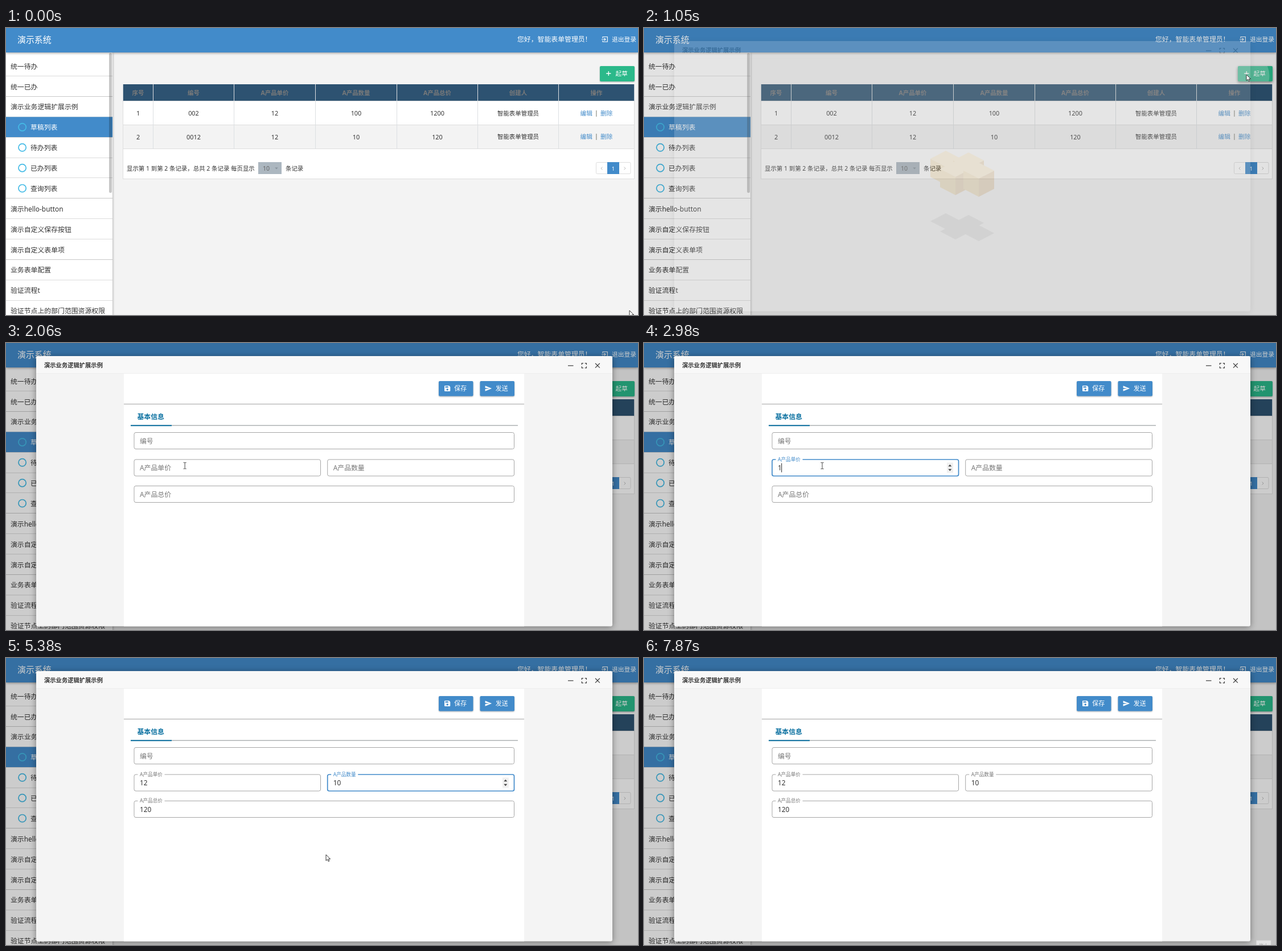
Animation of 1110x505 px, one loop 7.94 s. Source, as an HTML page:

```html
<!DOCTYPE html>
<html lang="zh-CN">
<head>
<meta charset="utf-8">
<title>演示系统</title>
<style>
  html, body { margin: 0; width: 100%; height: 100%; overflow: hidden; background: #f3f3f3; }
  svg { display: block; width: 1110px; height: 505px; }
  text { font-family: "Noto Sans", "Noto Sans CJK SC", sans-serif; white-space: pre; }
  .bar { filter: drop-shadow(0 1px 2px rgba(0, 0, 0, .4)); }
  .btn { filter: drop-shadow(0 1px 1.2px rgba(0, 0, 0, .3)); }
  .win { filter: drop-shadow(0 2px 6px rgba(0, 0, 0, .4)); }
</style>
</head>
<body>
<svg id="stage" viewBox="0 0 1110 505"></svg>
<script>
const LOOP = 7940, BLUE = '#428bca', INK = '#333', BASE = 11.86, SMALL = 10.45;
const stage = document.getElementById('stage');
let layer = stage;

function el(tag, attrs, parent = layer) {
  const node = document.createElementNS('http://www.w3.org/2000/svg', tag);
  for (const k in attrs) node.setAttribute(k, attrs[k]);
  return parent.appendChild(node);
}
const set = (node, attrs) => { for (const k in attrs) node.setAttribute(k, attrs[k]); };
const group = (attrs = {}, parent = stage) => (layer = el('g', attrs, parent));
const rect = (x, y, width, height, fill, more) => el('rect', { x, y, width, height, fill, ...more });
const path = (d, more) => el('path', { d, fill: 'none', ...more });
const line = (d, stroke, width = 1) => path(d, { stroke, 'stroke-width': width });
// text is placed by the vertical centre of its glyphs
function label(x, cy, str, size = BASE, fill = INK, more) {
  const node = el('text', { x, y: cy + size * .37, 'font-size': size, fill, ...more });
  node.textContent = str;
  return node;
}
const MID = { 'text-anchor': 'middle' }, BOLD = { 'font-weight': 700 };

const ramp = (t, a, b) => Math.min(1, Math.max(0, (t - a) / (b - a)));
const ease = p => p * p * (3 - 2 * p);
const during = (t, a, b) => t >= a && t < b;
const show = (node, on) => node.setAttribute('visibility', on ? 'visible' : 'hidden');

// ---- list page ----
group();
rect(0, 0, 1110, 505, '#f3f3f3');

rect(0, 43, 187, 462, '#fff', { class: 'bar' });
const menu = ['统一待办', '统一已办', '演示业务逻辑扩展示例', '草稿列表', '待办列表', '已办列表', '查询列表',
  '演示hello-button', '演示自定义保存按钮', '演示自定义表单项', '业务表单配置', '验证流程t', '验证节点上的部门范围资源权限'];
menu.forEach((name, i) => {
  const y = 67 + 35.88 * i, sub = i > 2 && i < 7, active = i === 3;
  line(`M0 ${Math.round(y + 17) + .5}H187`, [1, 6, 9].includes(i) ? '#c8c8c8' : '#dcdcdc');
  if (active) rect(0, 156.5, 187, 35.5, BLUE);
  if (sub) el('circle', { cx: 28.6, cy: y - .2, r: 6.6, fill: 'none', stroke: '#45bbe6', 'stroke-width': 1.7 });
  label(sub ? 43 : 8, y + .3, name, BASE, active ? '#fff' : INK);
});
rect(181, 44, 5, 246, '#000', { opacity: .22, rx: 2 });

rect(0, 0, 1110, 43, BLUE, { class: 'bar' });
label(20, 20, '演示系统', 14.9, '#fff');
label(898, 20, '您好，智能表单管理员！', BASE, '#fff');
path('M1048 18V15.5H1056.3V24.3H1048V22M1046 20H1053M1050.6 17.6 1053 20 1050.6 22.4', { stroke: '#fff', 'stroke-width': 1.1 });
label(1064, 20, '退出登录', 10.75, '#fff');

const draft = rect(1043, 67, 61, 27, '#2bb98a', { rx: 2, class: 'btn' });
const clip = el('clipPath', { id: 'draftBox' });
el('rect', { x: 1043, y: 67, width: 61, height: 27, rx: 2 }, clip);
const ripple = el('circle', { cx: 1058, cy: 84, r: 0, fill: '#fff', 'clip-path': 'url(#draftBox)' });
line('M1054.2 80H1062.4M1058.3 76V84', '#fff', 1.3);
label(1070.5, 80, '起草', 10.7, '#fff');

const edges = [205.5, 258.5, 400.5, 543.5, 686.5, 828.5, 970.5, 1103.5];
const heads = ['序号', '编号', 'A产品单价', 'A产品数量', 'A产品总价', '创建人', '操作'];
const rows = [['1', '002', '12', '100', '1200', '智能表单管理员'], ['2', '0012', '12', '10', '120', '智能表单管理员']];
const mid = i => (edges[i] + edges[i + 1]) / 2;
rect(205.5, 128.5, 898, 137, '#fff', { stroke: '#dedede' });
rect(205.5, 99, 898, 29.5, '#2d5271');
rect(206, 170.5, 897, 42, '#f3f3f3');
line('M205.5 128.5H1103.5M205.5 170.5H1103.5M205.5 212.5H1103.5', '#dedede');
edges.slice(1, 7).forEach(x => line(`M${x} 99V212.5`, '#dcdfe2'));
line('M205.5 99V128M1103.5 99V128', '#c3ccd4');
heads.forEach((h, i) => label(mid(i), 114.5, h, SMALL, '#7a7a7a', { ...MID, ...BOLD }));
rows.forEach((row, r) => {
  const y = 150 + 41.5 * r;
  row.forEach((v, i) => label(mid(i), y, v, i < 5 ? 10.9 : SMALL, INK, MID));
  label(1008.5, y, '编辑', 10.7, BLUE);
  label(1037, y - 1, '|', 10.7, '#554', MID);
  label(1044, y, '删除', 10.7, BLUE);
});
label(212, 247, '显示第 1 到第 2 条记录，总共 2 条记录 每页显示', SMALL);
rect(443, 236, 41, 21, '#acb7c0');
label(451, 247, '10', 10.6, '#666');
path('M472.3 245.5H477.7L475 248.6Z', { fill: '#87929b' });
label(491, 247, '条记录', SMALL);
rect(1036.5, 236.5, 60.5, 20, '#fff', { stroke: '#ddd', rx: 2 });
rect(1056, 236, 21, 21, BLUE);
label(1066.5, 247, '1', 9.5, '#fff', MID);
line('M1047.5 244.5 1045 247 1047.5 249.5M1085.5 244.5 1088 247 1085.5 249.5', '#bbb');

group();
const shade = rect(0, 0, 1110, 505, '#000');

// ---- dialog ----
const dialog = group();
rect(53, 23, 1012, 475.5, '#f4f4f4', { rx: 3, class: 'win' });
path('M53 54V26Q53 23 56 23H1062Q1065 23 1065 26V54Z', { fill: '#f8f8f8' });
line('M53 53.5H1065', '#eee');
label(67, 39, '演示业务逻辑扩展示例', 10.3, INK, BOLD);
line('M987 39.8H996.5M1035 35.8 1042.8 43.6M1042.8 35.8 1035 43.6', '#444', 1.3);
line('M1011.3 38.2V35.6H1014M1016.7 35.6H1019.4V38.2M1019.4 41.2V43.8H1016.7M1014 43.8H1011.3V41.2', '#444', 1.3);

// loading picture
const loading = group({}, dialog);
const diamond = (x, y) => `M${x - 27} ${y}L${x} ${y - 14} ${x + 27} ${y} ${x} ${y + 14}Z`;
[[530, 230], [570, 233], [547, 248], [588, 251]].forEach(([x, y], i) => {
  path(diamond(x, y + 110), { fill: '#bcbcbc' });
  path(`M${x - 27} ${y}L${x} ${y + 14}V${y + 46}L${x - 27} ${y + 32}Z`, { fill: '#e8b650' });
  path(`M${x + 27} ${y}L${x} ${y + 14}V${y + 46}L${x + 27} ${y + 32}Z`, { fill: '#cf9440' });
  path(diamond(x, y), { fill: '#ffd888' });
});

// form
const form = group({}, dialog);
rect(207, 54, 703, 444.5, '#fff');
line('M207 107.5H910', '#bdbdbd', 1.7);
[[760, '保存'], [832.5, '发送']].forEach(([x, name]) => {
  rect(x, 67, 60.5, 26.5, BLUE, { rx: 2, class: 'btn' });
  label(x + 27.3, 80, name, 11, '#fff');
});
path('M770 76.2Q770 75 771.2 75H778L780.3 77.3V83.8Q780.3 85 779.1 85H771.2Q770 85 770 83.8ZM771.5 76.2V78.6H776.8V76.2ZM775.2 80.2A1.7 1.7 0 1 0 775.21 80.2Z',
  { fill: '#fff', 'fill-rule': 'evenodd' });
path('M841.6 75.2 853.2 80 841.6 84.8V81.1L849.5 80 841.6 78.9Z', { fill: '#fff' });
label(230.5, 130, '基本信息', BASE, '#0a70a0', BOLD);
line('M219 145.2H899', '#b9bcbe', 1.7);
line('M219 145.2H291', '#0a70a0', 2);

function makeField(x, y, w, name) {
  const g = group({}, form);
  const box = rect(x + .5, y + .5, w - 1, 29, '#fff', { rx: 3 });
  const notch = rect(x + 7, y - 1, 47, 3, '#fff');
  const text = label(0, 0, name);
  const value = label(x + 10.5, y + 15.3, '');
  const caret = rect(x + 10, y + 7, 1, 16, '#222');
  const spin = group({}, g);
  rect(x + w - 21, y + 6, 11, 18, '#f0f0f0');
  path(`M${x + w - 18.7} ${y + 12.8}h6l-3-3.6zM${x + w - 18.7} ${y + 17.2}h6l-3 3.6z`, { fill: '#444' });
  return {
    holds: (px, py) => px > x && px < x + w && py > y && py < y + 30,
    draw(lift, focus, str = '', blink = false) {
      const k = 1 - lift * .275;
      set(box, { stroke: focus ? BLUE : '#a6a6a6', 'stroke-width': focus ? 1.7 : 1 });
      set(notch, { width: 47 * lift });
      set(text, { transform: `translate(${x + 10.5} ${y + 15.2 - 15 * lift}) scale(${k})`, fill: focus ? BLUE : '#777' });
      value.textContent = str;
      set(caret, { x: x + 10 + 6.7 * str.length });
      show(caret, blink);
      show(spin, focus);
    }
  };
}
const code = makeField(224.5, 157, 668.5, '编号');
const price = makeField(224.5, 204.5, 328.5, 'A产品单价');
const count = makeField(564.2, 204.5, 328.8, 'A产品数量');
const total = makeField(224.5, 251, 668.5, 'A产品总价');
const fields = [code, price, count, total];

// ---- pointer and tooltip ----
const tip = group();
rect(1075.5, 497, 25.5, 20, '#e4e4e4', { stroke: '#d2d2d2', 'stroke-width': .8 });
label(1088, 506.5, '停止', 8.6, '#aaa', MID);

const pointer = group();
const arrow = path('M0 0V10.6L2.5 8.3 4.2 12 5.9 11.2 4.3 7.7H7.6Z', { fill: '#fff', stroke: '#222', 'stroke-width': .9 });
const beam = line('M-2.5 -5.5H-.6L0 -5 .6 -5.5H2.5M0 -5V5M-2.5 5.5H-.6L0 5 .6 5.5H2.5', '#444', 1);

const stops = [[0, 1095, 497], [60, 1095, 497], [850, 1058, 82], [1280, 1058, 82], [1690, 480, 183],
  [2080, 313, 216], [3330, 313, 216], [3860, 604, 216], [4940, 604, 216], [5350, 562, 346], [5600, 562, 346], [6140, 1062, 512]];
function pointerAt(t) {
  const i = stops.findIndex(s => s[0] > t);
  if (i < 0) return [1062, 520];
  const [a, x, y] = stops[i - 1], [b, x2, y2] = stops[i];
  const p = ease(ramp(t, a, b));
  return [x + (x2 - x) * p, y + (y2 - y) * p];
}

function render(t) {
  // ripple on the draft button
  const pressed = during(t, 890, 1200);
  set(ripple, { r: pressed ? 27 + (t - 980) * .19 : 0, opacity: .24 * (1 - ramp(t, 1070, 1200)) });
  draft.style.filter = during(t, 800, 1400) ? 'drop-shadow(0 2px 2.5px rgba(0,0,0,.45))' : '';

  set(shade, { opacity: .2 * ramp(t, 1013, 1080) });
  const fade = ramp(t, 1015, 1222);
  set(dialog, { opacity: fade, display: fade ? 'inline' : 'none' });
  set(loading, { display: t < 1110 ? 'inline' : 'none' });
  set(form, { display: t < 1110 ? 'none' : 'inline' });

  const unit = t < 2980 ? '' : t < 3210 ? '1' : '12';
  const amount = t < 4450 ? '' : t < 4680 ? '1' : '10';
  const sum = t < 4530 ? '' : t < 4990 ? '12' : '120';
  code.draw(0, false);
  price.draw(ease(ramp(t, 2250, 2450)), during(t, 2250, 3950), unit,
    during(t, 2250, 2750) || during(t, 2980, 3710));
  count.draw(ease(ramp(t, 3950, 4150)), during(t, 3950, 5610), amount,
    during(t, 3950, 5180));
  total.draw(ease(ramp(t, 4480, 4680)), false, sum);

  const [x, y] = pointerAt(t);
  const typing = t > 1222 && fields.some(f => f.holds(x, y));
  set(pointer, { transform: `translate(${x} ${y})` });
  show(arrow, !typing);
  show(beam, typing);

  set(tip, {
    opacity: .35 * ramp(t, 6900, 7010) + .65 * ramp(t, 7450, 7870),
    transform: `translate(0 ${3 - 3 * ramp(t, 7450, 7800)})`
  });
}

const start = performance.now();
(function tick() {
  render((performance.now() - start) % LOOP);
  requestAnimationFrame(tick);
})();
</script>
</body>
</html>
```
